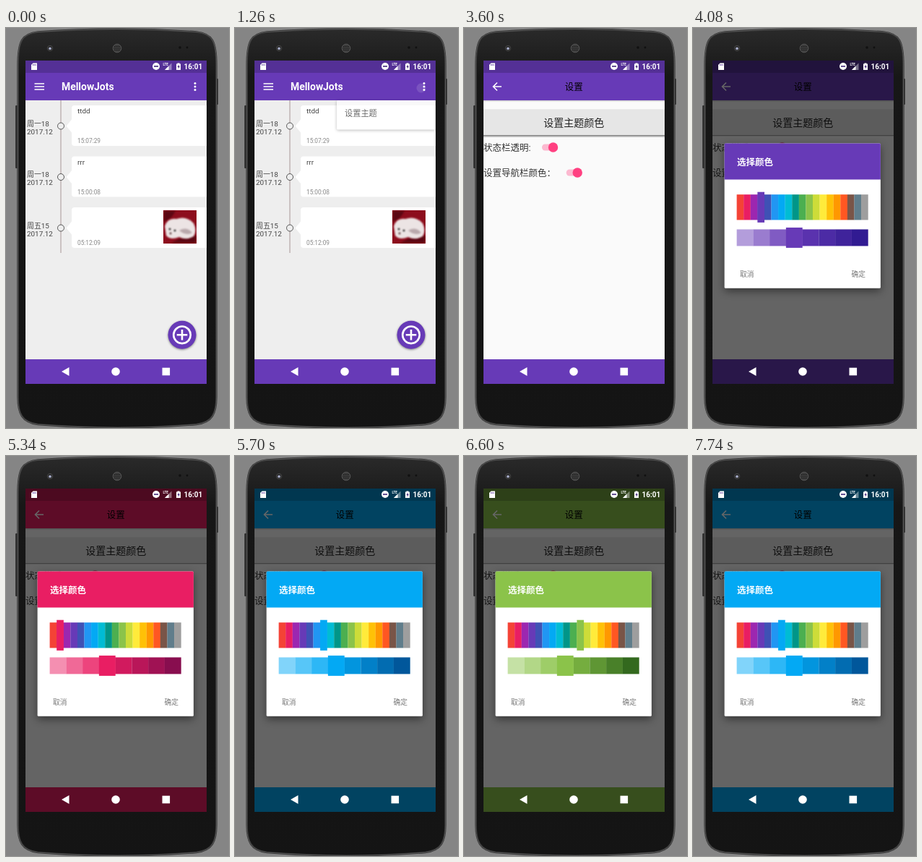
An HTML page that plays this animation: 309x553 px, repeating every 8 s.

```html
<!DOCTYPE html>
<html lang="zh-CN">
<head>
<meta charset="utf-8">
<title>Theme colour picker</title>
<style>
  html, body { margin: 0; width: 100%; height: 100%; overflow: hidden; background: #858585; }
  svg { display: block; width: 100vw; height: 100vh; --main: #673ab7;
        font-family: Roboto, "Noto Sans CJK SC", "Noto Sans CJK", sans-serif; }
  .main { fill: var(--main); }
  .line { fill: none; stroke: #fff; stroke-width: 1.6; }
  #popup rect { filter: drop-shadow(0 1px 2px #0006); }
  #fab circle:first-child { filter: drop-shadow(0 1px 1.5px #0007); }
  #sheet { filter: drop-shadow(0 4px 6px #0007); }
  #photo { filter: blur(.8px); }
</style>
</head>
<body>
<svg id="stage" viewBox="0 0 309 553" preserveAspectRatio="none"></svg>
<script>
const LOOP = 8000, TICK = 60;

// light, base and dark tone of each hue
const HUES = `ef9a9a f44336 b71c1c,f48fb1 e91e63 880e4f,ce93d8 9c27b0 4a148c,b39ddb 673ab7 311b92,
9fa8da 3f51b5 1a237e,90caf9 2196f3 0d47a1,81d4fa 03a9f4 01579b,80deea 00bcd4 006064,80cbc4 009688 004d40,
a5d6a7 4caf50 1b5e20,c5e1a5 8bc34a 33691e,e6ee9c cddc39 827717,fff59d ffeb3b f57f17,ffe082 ffc107 ff6f00,
ffcc80 ff9800 e65100,ffab91 ff5722 bf360c,bcaaa4 795548 3e2723,b0bec5 607d8b 263238,eeeeee 9e9e9e 212121`
  .split(',').map(row => row.trim().split(' ').map(hex => '#' + hex));

// drags across the hue bar: start time, then one hue per tick
const DRAGS = [
  [0, [3]],
  [4740, [2, 1, 1, 0]],
  [5340, [1, 2, 2, 3, 4, 4, 6, 8, 10, 11, 13, 14, 15, 16, 17, 17, 18]],
  [6480, [17, 14, 10, 8, 7, 6, 6, 4]],
  [7200, [5]],
  [7740, [6]],
];

const rect = (x, y, w, h, attrs = '') => `<rect x="${x}" y="${y}" width="${w}" height="${h}" ${attrs}/>`;
const circle = (x, y, r, attrs = '') => `<circle cx="${x}" cy="${y}" r="${r}" ${attrs}/>`;
const path = (d, attrs = '') => `<path d="${d}" ${attrs}/>`;
const text = (x, midY, size, str, attrs = '') =>
  `<text x="${x}" y="${midY + size * .365}" font-size="${size}" ${attrs}>${str}</text>`;

const bars = () =>
  rect(27, 45, 251, 55, 'class="main"') + rect(27, 45, 251, 17, 'opacity=".18"') +
  rect(27, 458, 251, 34, 'class="main"');

const photo = () =>
  rect(218, 252, 46, 46, 'fill="#8d0d1d"') +
  `<g id="photo">` +
  path('M219 253h16l-6 9-10 6zM263 287v10h-34l12-6z', 'fill="#5c0612"') +
  path('M220 274Q224 262 236 264Q250 259 260 270Q265 280 260 288Q250 294 240 289Q228 294 222 287Z', 'fill="#ece4e4"') +
  path('M240 280Q250 274 258 283Q250 288 240 280Z', 'fill="#b9a9ac"') +
  circle(227, 278, 1.3) + circle(234, 280, 1.3) + circle(228, 284, 1.4, 'fill="#533"') + '</g>';

function note(i, day, title, time) {
  const y = 107 + i * 70.5, mid = y + 28.5;
  return `<g fill="#444">` +
    text(29, mid - 3.5, 9.9, day) + text(29, mid + 7.5, 9.9, '2017.12') +
    path(`M278 ${y}H95Q91 ${y} 91 ${y + 4}V${mid - 9}L83.5 ${mid}L91 ${mid + 9}V${y + 52}Q91 ${y + 56} 95 ${y + 56}H278Z`, 'fill="#fff"') +
    circle(76, mid, 4.5, 'fill="#eee" stroke="#555"') +
    text(99, y + 7.8, 9.8, title) + text(99, y + 49, 8.3, time, 'fill="#888"') + '</g>';
}

const notesPage = () =>
  rect(27, 45, 251, 447, 'fill="#eee"') + bars() +
  path('M39.5 77h13.5M39.5 81h13.5M39.5 85h13.5', 'class="line"') +
  text(77, 81.3, 13.9, 'MellowJots', 'fill="#fff" font-weight="600"') +
  [76.5, 81, 85.5].map(y => circle(262, y, 1.5, 'fill="#fff"')).join('') +
  circle(258, 83, 6.5, 'id="ripple" fill="#fff"') +
  rect(75.5, 100, 1, 211, 'fill="#a79696"') +
  note(0, '周一18', 'ttdd', '15:07:29') + note(1, '周一18', 'rrr', '15:00:08') +
  note(2, '周五15', '', '05:12:09') + photo() +
  `<g id="fab">${circle(244, 424.3, 19.5, 'class="main"')}${circle(244, 424.3, 11.8, 'class="line" style="stroke-width:2.6"')}
   ${path('M236.7 424.3h14.6M244 417v14.6', 'class="line" style="stroke-width:2.6"')}</g>`;

const toggle = (x, y) =>
  rect(x, y - 4.5, 22, 9, 'rx="4.5" fill="#ff4081" opacity=".35"') + circle(x + 15.5, y, 6.7, 'fill="#ff4081"');

const settingsPage = () =>
  rect(27, 45, 251, 447, 'fill="#fafafa"') + bars() +
  rect(27, 100, 251, 1.5, 'opacity=".15"') +
  path('M52 81H41M46 75.5L40.5 81L46 86.5', 'class="line"') +
  text(139.7, 81, 12.5, '设置') +
  rect(27, 148, 251, 3, 'id="press"') +
  rect(27, 112.5, 251, 1, 'opacity=".12"') +
  rect(27, 148, 251, 1.3, 'opacity=".35"') + rect(27, 113, 251, 35, 'fill="#e6e6e6"') +
  text(110.3, 131, 14, '设置主题颜色', 'fill="#222"') +
  text(27, 165, 12.5, '状态栏透明:', 'fill="#333"') + toggle(108, 165) +
  text(27, 200, 12.5, '设置导航栏颜色：', 'fill="#333"') + toggle(141.7, 200);

const dialog = () =>
  rect(43.6, 159.6, 216.3, 200.2, 'id="sheet" rx="1.5" fill="#fff"') +
  path('M43.6 209.6V161.1Q43.6 159.6 45.1 159.6H258.4Q259.9 159.6 259.9 161.1V209.6Z', 'class="main"') +
  text(61, 185, 12.5, '选择颜色', 'fill="#fff" font-weight="700"') +
  '<g id="hues"></g><g id="shades"></g>' +
  text(65, 340, 9.76, '取消', 'fill="#777"') + text(219.5, 340, 9.76, '确定', 'fill="#777"');

const systemIcons = () => `<g fill="#fff">` +
  path('M37.5 48.5H43V58H35V51Z') +
  path('M37.5 50v2M39.3 50v2M41.1 50v2', 'stroke="#5b37a0" stroke-width=".8"') +
  circle(208, 53, 5) + rect(205, 52.2, 6, 1.6, 'fill="#43287a"') +
  text(217.5, 50, 4.5, 'LTE', 'font-weight="700"') +
  path('M220 58L229.5 48.5V58Z', 'opacity=".4"') + path('M220 58L225.5 52.5V58Z') +
  path('M236 49.5h1.5v-1h3v1H242V58H236Z') +
  path('M239.5 50.5l-2 3.5h1.4v2.5l2-3.7h-1.4z', 'fill="#43287a"') +
  text(246.5, 53.3, 10, '16:01', 'font-weight="600"') +
  path('M87.5 469V481L77 475Z') + circle(152, 475, 5.8) + rect(216.5, 469.7, 10.6, 10.6) + '</g>';

const phone = () => {
  const body = `M16.5 510V52C16.5 18 22 8 44 5.5Q154 -2.5 264 5.5C286 8 291.5 18 291.5 52
    V510C291.5 533 286 545 264 548Q154 557 44 548C22 545 16.5 533 16.5 510Z`;
  return `<linearGradient id="shell" x2="0" y2="1"><stop stop-color="#2a2a2a"/><stop offset=".12" stop-color="#171717"/>
    <stop offset="1" stop-color="#141414"/></linearGradient>` +
    rect(0, 0, 309, 553, 'fill="#858585"') +
    rect(13, 107, 4, 87, 'rx="1" fill="#333"') + rect(290.5, 70, 3.5, 36, 'rx="1" fill="#333"') +
    path(body, 'fill="url(#shell)" stroke="#333" stroke-width="2.4"') +
    path(body, 'fill="none" stroke="#5c5c5c" stroke-width=".9"') +
    circle(61, 28, 3.6, 'fill="#222" stroke="#4a4a4a"') + circle(61, 28.3, 1.9, 'fill="#a4a9c4"') +
    circle(154, 28, 5.8, 'fill="#3d3d3d" stroke="#555"') +
    path('M150 25.5h8M149 28h10M150 30.5h8', 'stroke="#161616" stroke-width="1.2" stroke-dasharray="1.2 1"') +
    circle(241, 27, 1.8, 'fill="#101010"') + circle(251, 27, 1.4, 'fill="#101010"');
};

const stage = document.getElementById('stage');
stage.innerHTML = `<clipPath id="screen">${rect(27, 45, 251, 447)}</clipPath>` + phone() +
  `<g clip-path="url(#screen)"><g id="notes">${notesPage()}</g>
   <g id="popup">${rect(141, 100, 136.5, 40.5, 'rx="1.4" fill="#fff"')}${text(152, 118, 11.2, '设置主题', 'fill="#222"')}</g>
   <g id="settings">${settingsPage()}</g>${rect(27, 45, 251, 447, 'id="dim"')}
   <g id="dialog">${dialog()}</g>${systemIcons()}</g>`;

const el = id => document.getElementById(id);
const fade = (id, a) => {
  el(id).style.opacity = a;
  el(id).style.display = a > 0 ? '' : 'none';
};
const ramp = (t, from, to) => Math.max(0, Math.min(1, (t - from) / (to - from)));

function hueAt(t) {
  const [start, steps] = DRAGS.findLast(d => t >= d[0]);
  return steps[Math.min(steps.length - 1, Math.floor((t - start) / TICK))];
}

function shade([light, base, dark], i) {
  return i < 3 ? `color-mix(in srgb, ${base} ${i / 3 * 100}%, ${light})`
               : `color-mix(in srgb, ${dark} ${(i - 3) / 4 * 100}%, ${base})`;
}

// a strip of swatches whose chosen one sticks out
function strip(id, colors, chosen, y, h, grow) {
  const w = 182 / colors.length;
  const swatch = (i, g) => rect(60.6 + i * w, y - g, w + .1, h + 2 * g, `style="fill:${colors[i]}"`);
  el(id).innerHTML = colors.map((_, i) => swatch(i, 0)).join('') + swatch(chosen, grow);
}

let shownHue = -1;
function setHue(hue) {
  if (hue === shownHue) return;
  shownHue = hue;
  stage.style.setProperty('--main', HUES[hue][1]);
  strip('hues', HUES.map(h => h[1]), hue, 230.2, 35.2, 3.5);
  strip('shades', Array.from({ length: 8 }, (_, i) => shade(HUES[hue], i)), 3, 278.4, 23, 2.5);
}

function draw(now) {
  const t = Math.floor(now % LOOP / TICK) * TICK;
  setHue(hueAt(t));

  fade('ripple', t >= 1020 && t < 1320 ? .13 : 0);
  fade('popup', ramp(t, 1140, 1320) * (1 - ramp(t, 2500, 2640)));

  const enter = ramp(t, 2400, 2700);
  fade('settings', ramp(t, 2400, 2580) * .98 + (t >= 2640 ? .02 : 0));
  el('settings').setAttribute('transform', `translate(0 ${47.2 * (1 - enter) ** 2})`);
  fade('press', t >= 3600 && t < 3900 ? .2 : 0);

  const open = ramp(t, 3840, 4080), zoom = .9 + .1 * open;
  fade('dim', .6 * open);
  fade('dialog', open);
  el('dialog').setAttribute('transform', `translate(152 260) scale(${zoom}) translate(-152 -260)`);
}

const start = performance.now();
function frame() {
  draw(performance.now() - start);
  requestAnimationFrame(frame);
}
frame();
</script>
</body>
</html>
```
